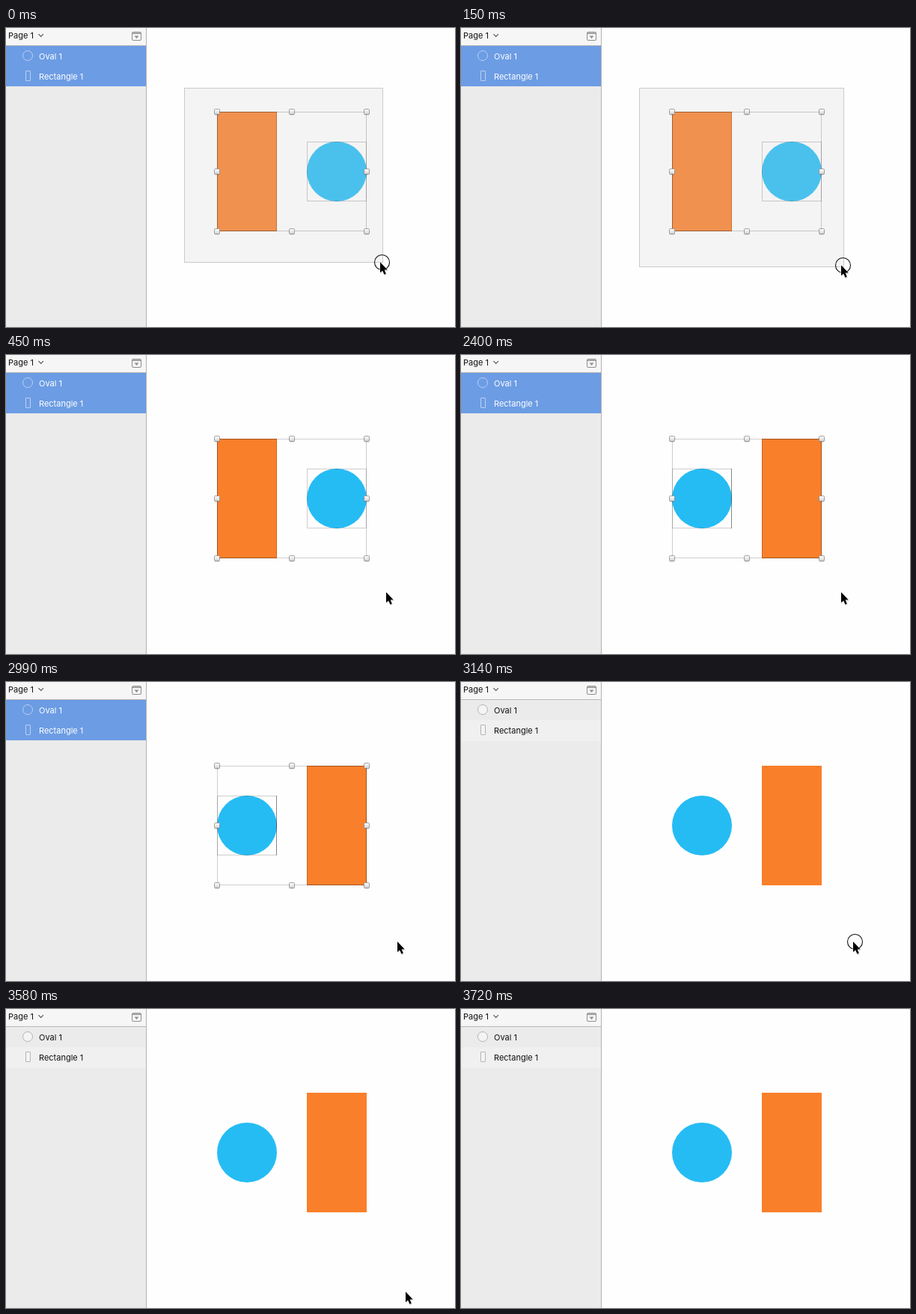
Write an HTML page that moves like this. It is 600 by 400 pixels and loops after 4.02 s.

```html
<!DOCTYPE html>
<html lang="en">
<head>
<meta charset="utf-8">
<title>Flip selected layers</title>
<style>
  html, body { margin: 0; width: 100%; height: 100%; overflow: hidden; background: #fefefe; }
  svg { display: block; width: 600px; height: 400px; }
  text { font: 11px Inter, Roboto, sans-serif; fill: #111; }
  .icon { fill: #f4f4f4; stroke: #b4b4b4; }
  .picked text { fill: #fff; }
  .picked .icon { fill: none; stroke: #b9d0f3; }
  .outline { fill: none; stroke: #000; stroke-opacity: .19; }
</style>
</head>
<body>
<svg viewBox="0 0 600 400">
  <defs>
    <linearGradient id="metal" x2="0" y2="1">
      <stop stop-color="#fff"/><stop offset="1" stop-color="#d2d2d2"/>
    </linearGradient>
    <g id="handle">
      <rect x="-3.5" y="-2.5" width="7" height="7" rx="1.5" fill="#000" opacity=".22"/>
      <rect x="-3.5" y="-3.5" width="7" height="7" rx="1.2" fill="url(#metal)" stroke="#8c8c8c" stroke-width=".8"/>
    </g>
  </defs>

  <rect width="600" height="400" fill="#fefefe"/>
  <rect id="bar" y="112" width="80" height="160" fill="#fa7f2b"/>
  <circle id="oval" cy="192" r="40" fill="#25bcf4"/>
  <rect id="marquee" x="238.5" y="80.5" fill="#d1d1d1" fill-opacity=".217" stroke="#cbcbcb"/>

  <g id="selection">
    <rect class="outline" x="282.5" y="112.5" width="199" height="159"/>
    <rect class="outline" id="barBox" y="112.5" width="79" height="159"/>
    <rect class="outline" id="ovalBox" y="152.5" width="79" height="79"/>
    <path id="ovalEdge" d="M361.5 152V232" stroke="#000" stroke-opacity=".35"/>
    <g id="handles"></g>
  </g>

  <rect width="187" height="400" fill="#ebebeb"/>
  <rect width="187" height="23" fill="#f6f6f6"/>
  <path d="M0 23.5H187" stroke="#b9b9b9"/>
  <text x="3" y="14">Page 1</text>
  <path d="M43.5 8.2L46.7 11.4L49.9 8.2" fill="none" stroke="#555" stroke-width="1.2"/>
  <rect x="168.5" y="5.5" width="12" height="11" rx="1.5" fill="none" stroke="#8e8e8e"/>
  <path d="M168.5 6.5H180.5V8H168.5Z M171.5 10.5H177.5L174.5 14Z" fill="#8e8e8e"/>
  <g id="layers">
    <rect id="rows" width="187"/>
    <circle class="icon" cx="29" cy="37" r="6.5"/>
    <text x="44" y="42">Oval 1</text>
    <rect class="icon" x="26.5" y="57.5" width="6" height="13" rx=".5"/>
    <text x="44" y="69">Rectangle 1</text>
  </g>
  <path d="M187.5 0V400" stroke="#b3b3b3"/>

  <circle id="ring" r="10" fill="none" stroke="#111" stroke-width="1.1"/>
  <g id="cursor">
    <path d="M1.3 .3V14.6L4.5 11.6L6.9 17L9.5 15.9L7.2 10.7H11.4Z" fill="#000" opacity=".22"/>
    <path d="M1 -.7V13.3L4.1 10.4L6.4 15.7L8.8 14.7L6.6 9.6H10.7Z" fill="#000" stroke="#fff" stroke-width=".9" paint-order="stroke"/>
  </g>
</svg>
<script>
const LOOP = 4020;
const FLIP = 2400, DESELECT = 3140;

// Pointer steps: start time, x, y, pressed
const pointer = [
  [0, 499, 314, 1], [150, 507, 318, 1], [450, 507, 318, 0],
  [2700, 507, 326, 0], [2840, 519, 344, 0], [2990, 522, 348, 0],
  [3140, 523, 348, 1], [3280, 523, 348, 0], [3580, 533, 379, 0],
];
const HIDE = 3720;

const el = id => document.getElementById(id);
const set = (id, attrs) => {
  for (const name in attrs) el(id).setAttribute(name, attrs[name]);
};
const show = (id, on) => set(id, { display: on ? "inline" : "none" });

for (const y of [112, 192, 272])
  for (const x of [282, 382, 482])
    if (x !== 382 || y !== 192)
      el("handles").innerHTML += `<use href="#handle" x="${x}" y="${y}"/>`;

function draw(t) {
  const flipped = t >= FLIP, selected = t < DESELECT;
  const barX = flipped ? 402 : 282, ovalX = flipped ? 282 : 402;
  set("bar", { x: barX });
  set("barBox", { x: barX + .5 });
  set("oval", { cx: ovalX + 40 });
  set("ovalBox", { x: ovalX + .5 });
  show("ovalEdge", flipped);
  show("selection", selected);

  el("layers").classList.toggle("picked", selected);
  set("rows", selected
    ? { y: 24, height: 54, fill: "#6c9ce4" }
    : { y: 51, height: 28, fill: "#f0f0f0" });

  const [, x, y, pressed] = pointer.findLast(step => step[0] <= t);
  set("cursor", { transform: `translate(${x} ${y})` });
  set("ring", { cx: x + 3.5, cy: y - .5 });
  show("cursor", t < HIDE);
  show("ring", pressed);

  show("marquee", t < 450);
  set("marquee", t < 150 ? { width: 265, height: 233 } : { width: 273, height: 239 });
}

const start = performance.now();
function frame() {
  draw((performance.now() - start) % LOOP);
  requestAnimationFrame(frame);
}
frame();
</script>
</body>
</html>
```
